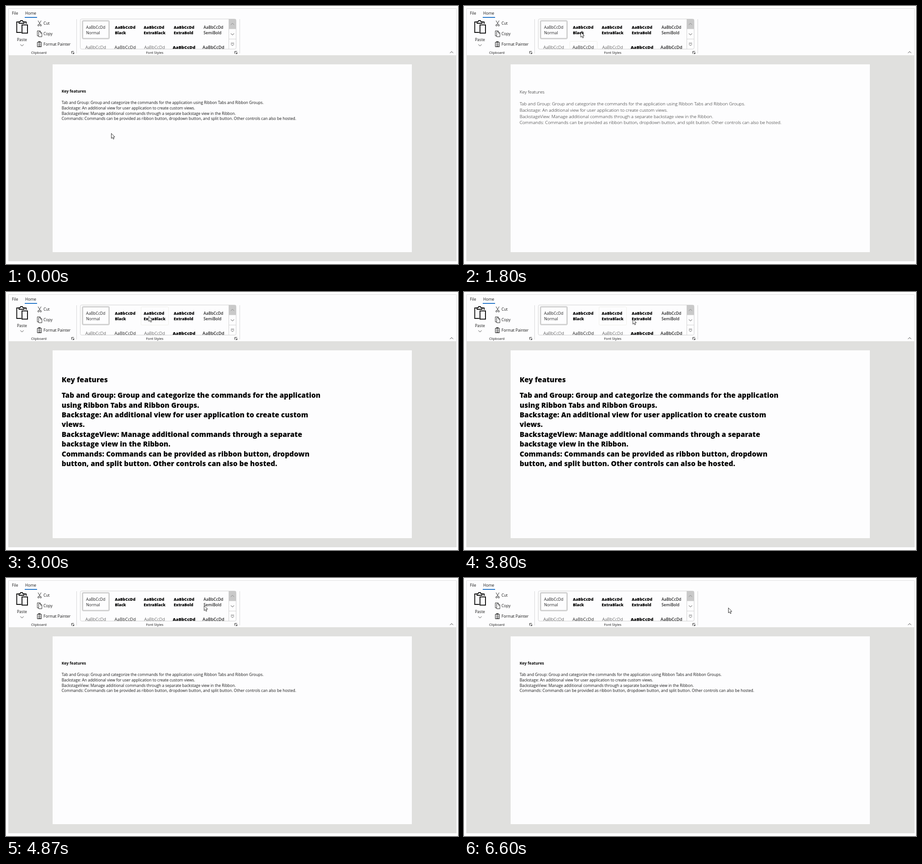
These frames come from a looping animation (989x566 px, 6.67 s). An HTML page with a canvas:

```html
<!DOCTYPE html>
<html lang="en">
<head>
<meta charset="utf-8">
<title>Ribbon gallery preview</title>
<style>
html, body { margin: 0; width: 100%; height: 100%; overflow: hidden; background: #fff; }
canvas { display: block; width: 989px; height: 566px; }
</style>
</head>
<body>
<canvas id="stage" width="989" height="566"></canvas>
<script>
const ctx = document.getElementById('stage').getContext('2d');
const LOOP = 6670, STEP = LOOP / 100;
const FAMILY = '"Open Sans", "Noto Sans", sans-serif';
const INK = '#161616', PAPER = '#fdfdfe', EDGE = '#d2d2d2';
const COLUMN = 64.4, TEXT_LEFT = 121.7, TEXT_WIDTH = 582;

const PARAGRAPHS = [
  'Tab and Group: Group and categorize the commands for the application using Ribbon Tabs and Ribbon Groups.',
  'Backstage: An additional view for user application to create custom views.',
  'BackstageView: Manage additional commands through a separate backstage view in the Ribbon.',
  'Commands: Commands can be provided as ribbon button, dropdown button, and split button. Other controls can also be hosted.'
];

const NORMAL = { lead: 11.87, weight: 400, heading: 700 };
const PREVIEWS = [
  { lead: 13.75, weight: 300, column: 1, row: 1 },
  { lead: 16.6, weight: 800, column: 1, row: 0 },
  { lead: 21.45, weight: 800, column: 2, row: 0 },
  { lead: 29.95, weight: 800, column: 3, row: 0 },
  { lead: 23.97, weight: 600, column: 4, row: 0 }
];

// Pointer tip at the moments it settles
const STOPS = [
  { t: 200, x: 230, y: 279 }, { t: 1400, x: 258, y: 84 }, { t: 1800, x: 255, y: 57 },
  { t: 2900, x: 310, y: 53 }, { t: 3900, x: 371, y: 59 }, { t: 4860, x: 433, y: 60 },
  { t: 5600, x: 439, y: 61 }, { t: 6330, x: 578, y: 65 }
];

const ARROW = new Path2D('M0 0v11l2.5-2.2 1.7 3.8 1.8-.8-1.6-3.8 3.2-.2z');

function setFont(size, weight) {
  ctx.font = `${weight} ${size}px ${FAMILY}`;
}

function text(str, x, y, size = 8.5, weight = 400, color = INK) {
  setFont(size, weight);
  ctx.fillStyle = color;
  ctx.fillText(str, x, y);
}

function rect(x, y, w, h, color) {
  ctx.fillStyle = color;
  ctx.fillRect(x, y, w, h);
}

function frame(x, y, w, h, color, width = 1, radius = 0) {
  ctx.strokeStyle = color;
  ctx.lineWidth = width;
  ctx.beginPath();
  ctx.roundRect(x, y, w, h, radius);
  ctx.stroke();
}

function path(d, color = '#333', width = 1) {
  ctx.strokeStyle = color;
  ctx.lineWidth = width;
  ctx.stroke(new Path2D(d));
}

function chevron(x, y, rise, color = '#444') {
  path(`M${x - 3.5} ${y - rise / 2}l3.5 ${rise}l3.5 ${-rise}`, color);
}

function launcher(x, y) {
  path(`M${x} ${y + 5}v-5h5M${x + 2} ${y + 2}l3 3M${x + 2} ${y + 5.2}h3.2v-3.2`);
}

function icons() {
  path('M33.5 58h-10V35H28M40 35h4v4', INK, 2);
  path('M28.5 38v-3.5H31l1-2.5h4l1 2.5h2.5V38z', INK, 1.8);
  frame(35, 41.5, 12, 18, INK, 2);
  path('M70 32l5.4 9M77 32l-5.4 9');
  for (const x of [69.4, 74.4]) frame(x, 40.8, 3.2, 3.2, '#333', 1, 1.6);
  path('M71 65.5h-2.5v-11H75V56M71.5 56.5H76l2.5 2.5v8.5h-7zM75.5 57v2.5H78');
  frame(68.5, 79.5, 9, 10, '#222');
  rect(70.5, 77.5, 5, 3, '#333');
  for (let y = 82.5; y < 89; y += 2) path(`M70.5 ${y}H76`, '#444');
}

function ribbon() {
  rect(5, 5, 981, 103, PAPER);
  text('File', 13, 19.3);
  text('Home', 42, 19.3);
  rect(41, 24, 27, 2, '#2677c9');
  icons();
  text('Paste', 24, 77.2);
  chevron(35, 86, 3.5);
  ['Cut', 'Copy', 'Format Painter'].forEach((label, i) => text(label, 82, 41.2 + 23.1 * i));
  text('Clipboard', 55, 105.4, 7.5);
  text('Font Styles', 306.5, 105.4, 7.5);
  for (const x of [143.5, 500.5]) launcher(x, 99.5);
  for (const x of [154.5, 511.5]) path(`M${x} 29v75`, '#d8d8d8');
  chevron(975, 101.5, -3.5);
}

// Left-aligned lines, centred as a block in their gallery column
function galleryItem(column, y, lines, size, weight) {
  setFont(size, weight);
  const width = Math.max(...lines.map(line => ctx.measureText(line).width));
  const x = 196.3 + column * COLUMN - width / 2;
  lines.forEach((line, i) => text(line, x, y + 12.1 * i, size, weight, weight > 700 ? '#000' : '#222'));
}

function gallery(style) {
  const sample = 'AaBbCcDd';
  frame(162.5, 28.5, 341, 66, EDGE, 1, 3);
  ctx.save();
  ctx.beginPath();
  ctx.rect(163, 29, 325, 65.5);
  ctx.clip();
  frame(167.5, 32.5, 58, 39, EDGE, 3, 2.5);
  if (style !== NORMAL) {
    frame(Math.round(166.5 + style.column * COLUMN) + .5, 32.5 + 45 * style.row, 60, 40, '#efefea', 1, 2);
  }
  ['Normal', 'Black', 'ExtraBlack', 'ExtraBold', 'SemiBold'].forEach((name, i) => {
    const weight = name === 'Normal' ? 400 : name === 'SemiBold' ? 600 : 800;
    galleryItem(i, 49.6, [sample, name], 8.6, weight);
  });
  [300, 400, 300, 800, 600].forEach((weight, i) => galleryItem(i, 94.4, [sample], 9.5, weight));
  ctx.restore();

  rect(488, 29, 15, 21.5, '#c9c9c9');
  path('M487.5 29v65M488 72.5h15', EDGE);
  chevron(495.5, 39.5, -3.5, '#8a8a8a');
  chevron(495.5, 62, 3.5);
  path('M492 81.5h7', '#555');
  chevron(495.5, 85.3, 3, '#555');
}

function wrap(paragraph) {
  const lines = [''];
  for (const word of paragraph.split(' ')) {
    const last = lines.length - 1;
    const longer = lines[last] ? `${lines[last]} ${word}` : word;
    if (ctx.measureText(longer).width > TEXT_WIDTH) lines.push(word);
    else lines[last] = longer;
  }
  return lines;
}

function page({ lead, weight, heading = weight }) {
  rect(5, 108, 981, 452, '#e0e0de');
  rect(102, 128, 786, 412, PAPER);
  const size = lead * (weight === 600 ? .709 : .72);
  let y = 180.5 + .81 * lead;
  text('Key features', TEXT_LEFT, y, size, heading, '#080808');
  y += 12.8;
  setFont(size, weight);
  for (const line of PARAGRAPHS.flatMap(wrap)) {
    y += lead;
    text(line, TEXT_LEFT, y, size, weight, weight === 800 ? '#060606' : INK);
  }
}

// Each preview holds for most of a second, with a short return to normal between
function styleAt(t) {
  const slot = Math.floor((t - 930) / 1000), phase = t - 930 - slot * 1000;
  const shown = phase < 930 && (slot > 0 || phase > 530);
  return shown && PREVIEWS[slot] || NORMAL;
}

function pointer(t) {
  const next = STOPS.findIndex(stop => stop.t > t);
  const b = STOPS[next < 0 ? STOPS.length - 1 : next];
  const a = next < 0 ? b : STOPS[Math.max(0, next - 1)];
  const u = a === b ? 0 : (t - a.t) / (b.t - a.t);
  const ease = u * u * (3 - 2 * u);
  ctx.save();
  ctx.translate(Math.round(a.x + (b.x - a.x) * ease) + .5, Math.round(a.y + (b.y - a.y) * ease) + .5);
  ctx.fillStyle = '#fff';
  ctx.fill(ARROW);
  ctx.strokeStyle = '#333';
  ctx.lineWidth = 1;
  ctx.stroke(ARROW);
  ctx.restore();
}

function draw() {
  const now = performance.now() % LOOP;
  const t = Math.floor((now + 4) / STEP) * STEP;
  const style = styleAt(t);
  rect(0, 0, 989, 566, '#fff');
  page(style);
  ribbon();
  gallery(style);
  frame(5.5, 5.5, 980, 554, '#dededf');
  pointer(t);
  requestAnimationFrame(draw);
}
requestAnimationFrame(draw);
</script>
</body>
</html>
```
